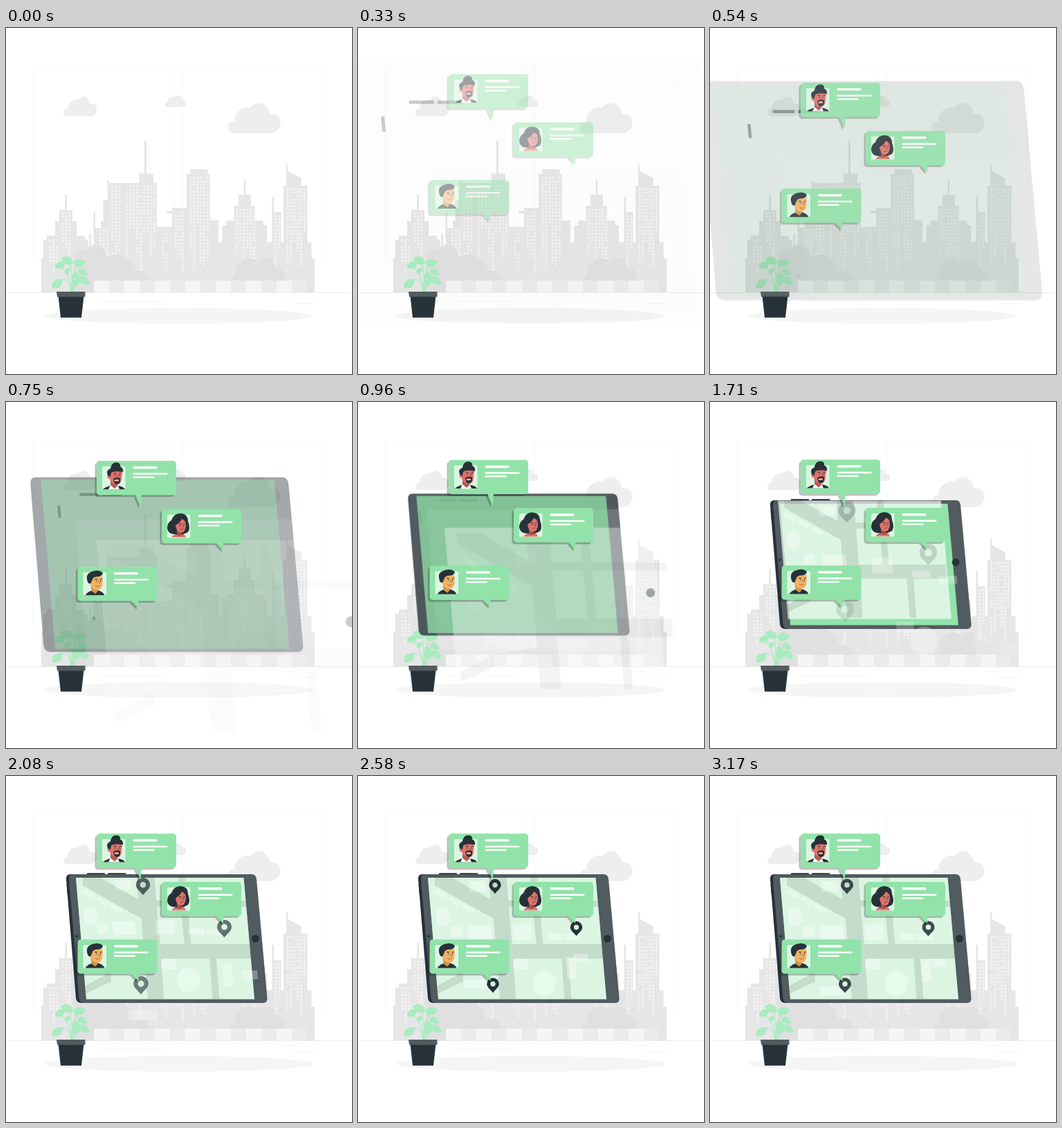
Recreate the animation shown at these times as an HTML page. Size 500x500 px, loop 3210 ms.

```html
<!DOCTYPE html>
<html lang="en">
<head>
<meta charset="utf-8">
<title>City map on a tablet</title>
<style>
html, body { margin: 0; width: 100%; height: 100%; overflow: hidden; background: #fff; }
svg { display: block; width: 100vw; height: 100vh; }
</style>
</head>
<body>
<svg id="stage" viewBox="0 0 500 500">
  <defs>
    <path id="cloud" d="M9 44A8.500 8.500 0 0 1 11 27C11 13 24 4 34 8C40 -4 60 -2 62 16C84 14 82 44 62 44Z" fill="#eee"/>
    <path id="leaf" d="M0 0C1 -8 9 -12 18 -6C15 3 7 5 0 0Z" fill="#a8ecbf"/>
  </defs>

  <g fill="none" stroke="#f8f8f8">
    <rect x="39" y="55.500" width="203.500" height="282"/>
    <rect x="255" y="55.500" width="203.500" height="282"/>
  </g>
  <use href="#cloud" transform="translate(319 108)"/>
  <use href="#cloud" transform="translate(82 99) scale(.635 .65)"/>
  <use href="#cloud" transform="translate(229 97) scale(.4 .39)"/>
  <path d="M0 382.500H497" stroke="#ebebeb"/>
  <path d="M135 395.500H225M400 389.500H417M416 398.500H448" stroke="#f3f3f3"/>
  <ellipse cx="249.500" cy="416" rx="194" ry="11.300" fill="#f5f5f5"/>

  <path fill="#e6e6e6" d="M51 382V332H54V306H59V300H71V279H77V263H85.300V241H88V263H96V279H102V300H114V306H119V316H120.500V297H123V318H126.500V266H129V289H137V279H140.500V249H146.500V220H149V224H192.500V210.500H200V163H203V210.500H213V224H218V287.500H240V268H232V264.500H240V260H261V211H266.500V204H291.500V211H295V278H307V309.500H312.500V285H318V278H329.500V257H336V241H343.500V219H346V241H354V257H360V278H371.500V285H377V309.500H384.500V244H387.300V266H397.500V309.500H401V228H405V197H407V207L426.500 217V228H435.500V309.500H441.500V333H446V382Z"/>
  <g id="windows" fill="#f1f1f1"></g>
  <path fill="#e0e0e0" d="M98 382V330C98 320 109 317 117 321C122 309 141 310 146 331C158 325 178 329 183 343C184 347 184 350 183 352C194 348 207 354 207 365V382Z"/>
  <path fill="#e0e0e0" d="M321 365C329 362 332 354 333 346C337 331 357 328 364 339C373 329 388 332 389 346C401 346 405 356 402 365Z"/>
  <g id="wall"></g>

  <g id="plant">
    <path fill="none" stroke="#a8ecbf" stroke-width="1.300" d="M95 382C95 365 97 350 90 334M96 382C95 362 99 346 106 340M95 382C93 360 86 350 78 343M97 382C97 362 102 355 110 353M94 382C93 368 86 358 74 367M97 382C99 374 104 366 112 365"/>
    <use href="#leaf" transform="translate(97.500 338.500) rotate(-145)"/>
    <use href="#leaf" transform="translate(97 341) rotate(11)"/>
    <use href="#leaf" transform="translate(71 347) rotate(-12) scale(.88)"/>
    <use href="#leaf" transform="translate(104 350) rotate(45) scale(.8)"/>
    <use href="#leaf" transform="translate(67 376) rotate(-22)"/>
    <use href="#leaf" transform="translate(105 361) rotate(48) scale(.93)"/>
    <use href="#leaf" transform="translate(100 353) rotate(105) scale(1.080)"/>
    <use href="#leaf" transform="translate(86 356) rotate(-40) scale(.6)"/>
    <path fill="#263238" d="M75.500 387H112.500L109 418.500H79Z"/>
    <path fill="#535b5f" d="M73 381H114.500V388.500H74Z"/>
  </g>

  <g id="tablet">
    <path id="body" fill="#263238" d="M93 142H355Q361 142 362 149L377.500 321Q378 328 371 328H109Q102 328 101 321L87 149Q86.500 142 93 142Z"/>
    <path id="keys" fill="#263238" d="M117 140.300H143V144H117ZM147 140.300H173V144H147ZM87.500 157H91L92.500 173H89Z"/>
    <path id="bezel" fill="#fff" fill-opacity=".2" d="M97 142H355Q361 142 362 149L377.500 321Q378 328 371 328H113Q106.500 328 105.500 321L91 149Q90.500 142 97 142Z"/>
    <path id="screen" fill="#92e3a9" d="M101 147H343.500L359 322.500H116Z"/>
    <g id="camera" fill="#263238"><circle cx="360.500" cy="235" r="5.500"/><circle cx="102.500" cy="231.500" r="1.800"/></g>
    <path id="glass" fill="#fff" fill-opacity=".67" d="M101 147H343.500L359 322.500H116Z"/>
    <g id="roads"><path fill-opacity=".1" d="M111 147H136L191 178L189 147H214.500L217.300 180H251.500L249 147H259L261.500 180H346.500L347.200 189H262.500L267.500 243H352L354 264H304L308.500 322.500H298.500L294 264H224L228 322.500H205L201.500 283L152 283V297L116 314L115 303L152 283L201 275L195.500 206L111 158ZM218 189L222.500 243H258L252.500 189Z"/></g>
    <g id="blocks" fill="#fff" fill-opacity=".36"></g>
  </g>
  <g id="pins"></g>
  <g id="cards"></g>
</svg>

<script>
const $ = id => document.getElementById(id);
const INK = '#263238';
const LOOP = 3210, FPS = 24, ZOOM = 1500, SLIDE = 1000;

function add(parent, tag, attrs, inner = '') {
  const el = document.createElementNS('http://www.w3.org/2000/svg', tag);
  for (const key in attrs) el.setAttribute(key, attrs[key]);
  el.innerHTML = inner;
  return parent.appendChild(el);
}

// Lit windows: every column of a tower runs down to a random depth, with gaps
let seed = 11;
const random = () => (seed = seed * 16807 % 2147483647) / 2147483647;

function tower(x, top, columns) {
  for (let c = 0; c < columns; c++) {
    const bottom = top + (358 - top) * (.45 + .55 * random());
    for (let y = top; y < bottom; y += 5)
      if (random() > .08) add($('windows'), 'rect', { x: x + c * 5, y, width: 3.2, height: 3.2 });
  }
}
tower(80, 266, 3);
tower(62, 305, 3);
tower(135, 291, 3);
tower(152, 229, 3);
tower(173, 227, 9);
tower(225, 291, 2);
tower(244, 265, 3);
tower(265, 215, 6);
tower(332, 261, 6);
tower(388, 270, 2);
tower(405, 231, 6);

for (let i = 0; i < 14; i++)
  add($('wall'), 'rect', { x: 127 + i * 22, y: 365, width: 22, height: 17, fill: i % 2 ? '#ebebeb' : '#f5f5f5' });

// Houses on the map, in order of arrival
const houses = [];
const place = (tag, attrs) => houses.push(add($('blocks'), tag, attrs));
const block = (x, y, w, h) => place('path', { d: `M${x} ${y}h${w}l${h * .086} ${h}h${-w}Z` });

for (let i = 0; i < 3; i++) place('path', { d: `M${109 + i * 20} ${168 + i * 10.5}l4 -5l16 9l-4 6Z` });
place('rect', { x: 113, y: 191, width: 19, height: 26, rx: 8 });
block(160, 152, 23, 15);
block(238, 178, 20, 20);
block(134, 218, 16, 15);
block(158, 216, 34, 21);
block(223, 215, 28, 22);
for (let i = 0; i < 2; i++) block(272 + i * 26, 227, 24, 10);
place('circle', { cx: 269, cy: 300, r: 17.5 });
block(224, 265, 21, 14);
block(304, 265, 14, 32);
block(320, 264, 21, 12);
block(158, 304, 38, 13);

const pins = [[198, 159.5], [315.5, 220.5], [195, 302.5]].map(([x, y], i) => ({
  x, y, delay: 1340 + i * 45,
  el: add($('pins'), 'path', {
    fill: INK, 'fill-rule': 'evenodd',
    d: `M${x} ${y + 11}c-4 -5 -9 -8 -9 -13a9 9 0 0 1 18 0c0 5 -5 8 -9 13Z` +
       `M${x - 3.8} ${y - 2}a3.8 3.8 0 1 0 7.6 0a3.8 3.8 0 1 0 -7.6 0Z`
  })
}));

// Portraits inside a 33 x 33 square
const line = (d, color, width) => `<path d="${d}" fill="none" stroke="${color}" stroke-width="${width}" stroke-linecap="round"/>`;
const shape = (d, color) => `<path d="${d}" fill="${color}"/>`;
const faces = [
  shape('M1 33Q4 30 11 28L24 28Q31 29 33 33Z', INK) +
  shape('M9 33L12 27L23 28L25 33Z', '#fff') +
  shape('M12 18H22V28L18 32L12 27Z', '#b75a54') +
  shape('M10 8Q20 3 29 7L28 18Q27 27 20 26Q12 24 11 18Q6 17 8 12Z', '#e0726b') +
  shape('M8 13Q5 5 12 3Q13 -6 21 -6Q27 -5 26 0Q31 2 30 8Q22 6 14 8Q12 10 12 15Z', INK) +
  shape('M16 18Q21 14 26 17Q27 25 21 26Q16 24 16 18Z', INK) +
  shape('M18 19Q22 17 24 19V21H18Z', '#e0726b') +
  line('M18 20.500H23', '#fff', 1) +
  line('M17 10H20M25 10H27M19 12V13M25 12V13', INK, 1) +
  line('M22 12L24 16', '#a84a48', .8),
  shape('M6 33Q9 28 15 28H23Q26 29 27 33Z', '#d1695f') +
  shape('M0 20Q0 11 6 8Q10 -3 20 -2Q30 -1 30 9Q34 20 30 25Q22 30 10 28Q2 28 0 20Z', INK) +
  shape('M14 20H20V30Q17 31 14 29Z', '#ad4d47') +
  shape('M12 15Q18 12 21 6Q27 8 27 15Q26 26 20 26Q13 25 12 15Z', '#e0726b') +
  line('M19 21Q22 22 23 20', '#8d3a38', 1) +
  line('M17 13H20M24 13H25M19 15V16M24 15V16', INK, 1) +
  line('M22 14L23 18', '#a84a48', .8) +
  shape('M6 32H27V33H6Z', '#e9b5a8'),
  shape('M3 33Q6 28 13 26H22Q29 28 31 33Z', INK) +
  shape('M11 17H21V27L18 31L12 27Z', '#d99345') +
  shape('M10 7Q18 3 28 6V18Q26 26 19 25Q12 24 11 17Q6 15 8 11Z', '#f0b263') +
  shape('M6 12Q3 2 12 -1Q22 -5 28 0Q29 5 22 6Q14 6 13 11L11 16Q7 17 6 12Z', INK) +
  line('M17 10H20M25 10H27M19 12V13M25 12V13', INK, 1) +
  line('M22 12L24 16M18 19Q21 22 24 19', '#a55d32', .9)
];

// Speech cards: corner, and where the tail starts, points to and ends
const cards = [[131, 83.3, 'M56 49L63.500 66.500L65 49Z'], [225, 153, 'M79 49L89 60V49Z'], [103.5, 236.2, 'M77 49L88 60V49Z']]
  .map(([x, y, tail], i) => {
    const outline = `<rect width="115" height="49.500" rx="4.500"/><path d="${tail}"/>`;
    const bar = (top, width, height) => `<rect x="52.500" y="${top}" width="${width}" height="${height}" rx="${height / 2}"/>`;
    const el = add($('cards'), 'g', {}, `
      <g transform="translate(-2.600 2.600)" opacity=".24">${outline}</g>
      <g fill="#92e3a9">${outline}</g>
      <rect x="8" y="8" width="33.500" height="33.500" rx="2" fill="#dcf5e3"/>
      <g transform="translate(8 8.300)">${faces[i]}</g>
      <g fill="#fff">${bar(8, 35, 3.5)}${bar(17.5, 50, 2.5)}${bar(22.5, 31, 2.5)}</g>`);
    return { el, x, y };
  });

// Overshooting curve: cubic-bezier(.36, -.01, .5, 1.38)
const bez = (a, b, u) => 3 * (1 - u) * (1 - u) * u * a + 3 * (1 - u) * u * u * b + u * u * u;
function ease(x) {
  if (x <= 0) return 0;
  if (x >= 1) return 1;
  let lo = 0, hi = 1;
  for (let i = 0; i < 24; i++) {
    const mid = (lo + hi) / 2;
    if (bez(.36, .5, mid) < x) lo = mid; else hi = mid;
  }
  return bez(-.01, 1.38, lo);
}

const clamp = v => Math.max(0, Math.min(1, v));
const fade = (el, p) => el.setAttribute('opacity', clamp(p));

function zoom(el, t, delay, cx = 0, cy = 0) {
  const p = ease((t - delay) / ZOOM);
  const s = 1.5 - .5 * p;
  el.setAttribute('transform', `translate(${cx * (1 - s)} ${cy * (1 - s)}) scale(${s})`);
  fade(el, p);
  return p;
}

function draw(t) {
  zoom($('tablet'), t, -60, 232, 235);
  zoom($('body'), t, 165, 232, 235);
  zoom($('bezel'), t, 150);
  zoom($('screen'), t, 210, 230, 235);
  zoom($('camera'), t, 275);
  zoom($('glass'), t, 365);
  zoom($('roads'), t, 435);
  houses.forEach((el, i) => zoom(el, t, 545 + 12 * i + 2.6 * i * i));

  const dim = .12 * clamp((t - 2880) / 290);
  pins.forEach(({ el, x, y, delay }) => {
    const p = zoom(el, t, delay, x, y);
    fade(el, Math.min(1, p) - dim);
  });

  const p = ease((t + 25) / SLIDE);
  cards.forEach(({ el, x, y }) => {
    el.setAttribute('transform', `translate(${x} ${y - 30 * (1 - p)})`);
    fade(el, t ? p : 0);
  });

  // The stage is still before the first step
  $('tablet').setAttribute('visibility', t ? 'visible' : 'hidden');
}

const start = performance.now();
function tick() {
  const t = Math.max(0, performance.now() - start) % LOOP;
  const step = Math.floor(t * FPS / 1000 + .13);
  draw(step < 3 ? 0 : step * 1000 / FPS);
  requestAnimationFrame(tick);
}
tick();
</script>
</body>
</html>
```
